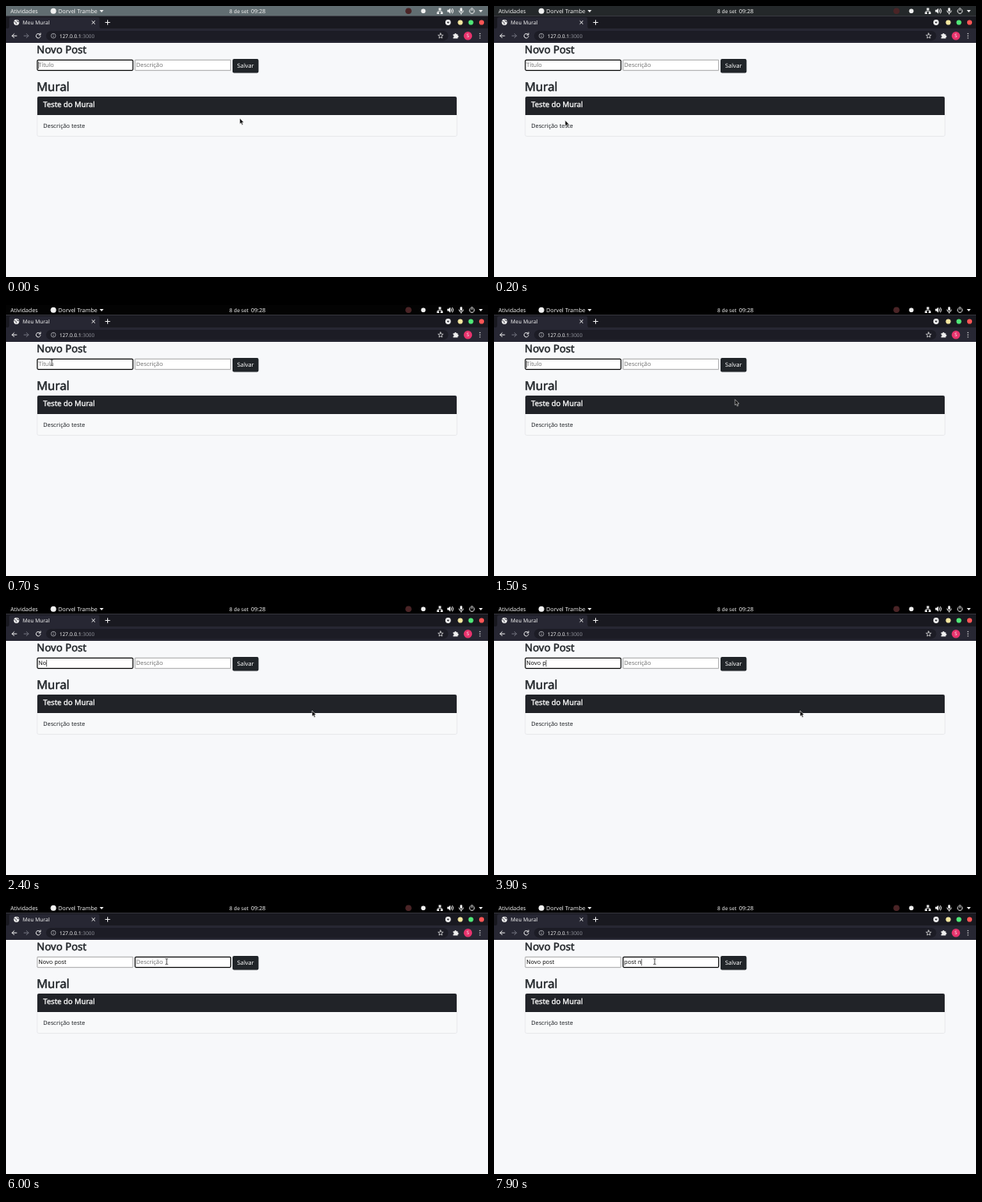
Animation, 600 px wide and 338 px high, one loop 8000 ms. Source, as an HTML page:

```html
<!DOCTYPE html>
<html lang="pt-BR">
<head>
<meta charset="utf-8">
<title>Meu Mural</title>
<style>
  html, body { margin: 0; width: 100%; height: 100%; overflow: hidden; background: #f7f8fa; }
  svg { display: block; width: 600px; height: 338px; }
  text { font-family: "Noto Sans", "Open Sans", sans-serif; font-size: 7.3px; fill: #212529; white-space: pre; text-rendering: geometricPrecision; }
  .bar text, .tabs text { fill: #f0f0f0; }
  .bar text { font-size: 7.05px; }
  .heading { stroke: #212529; stroke-width: .5; }
  .line { fill: none; stroke: #f0f0f0; stroke-width: 1; stroke-linecap: round; stroke-linejoin: round; }
  .lit { fill: #f0f0f0; }
</style>
</head>
<body>
<svg viewBox="0 0 600 338">
  <rect width="600" height="338" fill="#f7f8fa"/>

  <g class="bar">
    <rect id="panel" width="600" height="12.5"/>
    <text x="5.5" y="8.8">Atividades</text>
    <circle class="lit" cx="59" cy="6.2" r="3.5"/>
    <text x="65" y="8.8">Dorvel Trambe</text>
    <path class="lit" d="M116.5 5h5l-2.5 3z"/>
    <text x="278" y="8.8" style="font-size:6.5px">8 de set</text>
    <text x="305" y="8.8">09:28</text>
    <circle cx="501" cy="6.2" r="3.8" fill="#4a2426"/>
    <circle class="lit" cx="519.5" cy="6.2" r="2.8"/>
    <path class="lit" d="M538.6 2.6h3v2.6h-3zM536.4 7.4h2.8v2.6h-2.8zM541 7.4h2.8v2.6h-2.8z"/>
    <path class="line" style="stroke-width:.7" d="M540.1 5v1.4M537.8 7.6v-1.2h4.6v1.2"/>
    <path class="lit" d="M549.3 4.8h1.7l2.2-2.1v7l-2.2-2.1h-1.7z"/>
    <path class="line" d="M554.4 4.8q1 1.4 0 2.8M555.8 3.4q2.2 2.8 0 5.6"/>
    <rect class="lit" x="565.2" y="2.2" width="2.8" height="5" rx="1.4"/>
    <path class="line" d="M563.9 6q0 2.6 2.7 2.6t2.7-2.6M566.6 8.6v1.6"/>
    <path class="line" d="M578.4 3.8a3 3 0 1 0 3.2 0M580 2.4v3.2"/>
    <path class="lit" d="M588.5 5h5l-2.5 3z"/>
  </g>

  <g class="tabs">
    <rect y="12.5" width="600" height="33.5" fill="#272733"/>
    <path fill="#191920" d="M0 12.5H600V28H119q-2.6 0-2.6-2.6V16q0-2-2-2H6q-2 0-2 2v9.4q0 2.6-2.6 2.6H0z"/>
    <circle class="lit" cx="13" cy="20.5" r="3.4"/>
    <path d="M10.2 19.2l2.4 1.3 .4 2.4M13.6 17.6l.4 1.6 2 .5" fill="none" stroke="#272733" stroke-width=".8"/>
    <text x="20.8" y="23.1" style="font-size:6.6px">Meu Mural</text>
    <path class="line" d="M107 18.7l3.6 3.6m0-3.6l-3.6 3.6M123.8 20.5h5.4m-2.7-2.7v5.4"/>
    <circle class="lit" cx="550.3" cy="20.5" r="3.4"/>
    <path d="M548.6 19.7h3.4l-1.7 2.1z" fill="#191920"/>
    <circle cx="565.5" cy="20.5" r="3.1" fill="#f6e7a0"/>
    <circle cx="578.7" cy="20.5" r="3.1" fill="#50e878"/>
    <circle cx="592" cy="20.5" r="3.1" fill="#ff5555"/>

    <rect x="50" y="31" width="500.5" height="12.4" rx="6.2" fill="#1c1c25"/>
    <path class="line" d="M13.2 37.2H7.6m2.5-2.5l-2.5 2.5 2.5 2.5"/>
    <path class="line" style="stroke:#70727e" d="M22.4 37.2H28m-2.5-2.5l2.5 2.5-2.5 2.5"/>
    <path class="line" d="M42.5 35.6a2.8 2.8 0 1 0 .5 2.2M43 34v2h-2"/>
    <g stroke="#a6a7ae" fill="none" stroke-width=".8">
      <circle cx="59" cy="37.2" r="2.9"/><path d="M59 36.8v2M59 35.2v.8"/>
    </g>
    <text x="66.5" y="39.5" style="font-size:6.45px">127.0.0.1<tspan fill="#8e9098">:3000</tspan></text>
    <path id="star" class="line" style="stroke-width:.7"/>
    <path class="lit" d="M556.6 35.2h1.8a1.1 1.1 0 0 1 2.2 0h1.8v1.8a1.1 1.1 0 0 1 0 2.2v1.4h-5.8v-1.7a1 1 0 0 0 0-2z"/>
    <circle cx="575" cy="37.2" r="5.2" fill="#e8336d"/>
    <text x="575" y="39.4" text-anchor="middle" style="font-size:6px">S</text>
    <path class="line" style="stroke-width:1.4" d="M590 34.5v0M590 37.2v0M590 39.9v0"/>
  </g>

  <text class="heading" x="38.3" y="59.3" style="font-size:13px">Novo Post</text>
  <g id="title"><rect x="39" y="67.3" width="119" height="13" fill="#fff"/><text x="40.3" y="76.4"></text><path/></g>
  <g id="desc"><rect x="160.7" y="67.3" width="119" height="13" fill="#fff"/><text x="162" y="76.4"></text><path/></g>
  <rect x="282" y="66" width="32.4" height="17.5" rx="1.9" fill="#212529"/>
  <text x="287.8" y="77.4" style="fill:#fff">Salvar</text>

  <text class="heading" x="38.2" y="105.5" style="font-size:15px">Mural</text>
  <rect x="38.9" y="113" width="522.4" height="49.5" rx="1.8" fill="#f8f9fa" stroke="#dfe0e2" stroke-width=".6"/>
  <path d="M39 136V114.8q0-1.8 1.8-1.8H559.2q1.8 0 1.8 1.8V136z" fill="#212328"/>
  <text x="46.3" y="125.5" style="font-size:9.3px;fill:#fff;stroke:#fff;stroke-width:.3">Teste do Mural</text>
  <text x="46.2" y="152">Descrição teste</text>

  <path id="arrow" d="M0 0v7.2l1.6-1.4 1.2 2.6 1.3-.6-1.2-2.5h2.2z" fill="#111" stroke="#fff" stroke-width=".5"/>
  <g id="beam" fill="none">
    <path d="M-1.6-3.6Q0-3.6 0-2.8Q0-3.6 1.6-3.6M0-3V3M-1.6 3.6Q0 3.6 0 2.8Q0 3.6 1.6 3.6" stroke="#fff" stroke-width="1.4"/>
    <path d="M-1.6-3.6Q0-3.6 0-2.8Q0-3.6 1.6-3.6M0-3V3M-1.6 3.6Q0 3.6 0 2.8Q0 3.6 1.6 3.6" stroke="#222" stroke-width=".8"/>
  </g>
</svg>
<script>
const LOOP = 8000, STEP = 100, BLINK = 500, FOCUS_AT = 5500;
const PANEL = [97, 109, 113], PANEL_FADE = 200;
const $ = id => document.getElementById(id);

// time, x, y of the pointer
const track = [
  [0, 291, 140], [100, 188, 141], [200, 88.5, 142.5], [400, 66, 92], [600, 57, 72],
  [1200, 57, 72], [1600, 381, 133], [4600, 381, 133], [5000, 236, 84],
  [5200, 204, 66], [5400, 200, 73], [LOOP, 200, 73]
];

const field = (id, hint, text, keys, caretStart) => {
  const [box, label, caret] = $(id).children;
  return { box, label, caret, hint, text, keys, caretStart, x: +label.getAttribute("x") };
};
const title = field("title", "Título", "Novo post",
  [1900, 2300, 2900, 3100, 3400, 3800, 4100, 4300, 4500], 1100);
const desc = field("desc", "Descrição", "post n",
  [6600, 6800, 6900, 7100, 7300, 7900], FOCUS_AT);

function pointerAt(t) {
  const i = Math.max(1, track.findIndex(p => p[0] >= t));
  const [t0, x0, y0] = track[i - 1], [t1, x1, y1] = track[i];
  const k = (t - t0) / (t1 - t0);
  return [x0 + (x1 - x0) * k, y0 + (y1 - y0) * k];
}

function drawField(f, t, focused) {
  const typed = f.keys.filter(k => k <= t);
  const value = f.text.slice(0, typed.length);
  f.label.textContent = value || f.hint;
  f.label.style.fill = value ? "#111" : "#757575";
  f.box.setAttribute("stroke", focused ? "#101010" : "#858585");
  f.box.setAttribute("stroke-width", focused ? 1.25 : .7);
  f.box.setAttribute("rx", focused ? 1.2 : .4);

  const since = t - (typed.length ? typed[typed.length - 1] : f.caretStart);
  const lit = t < STEP || since >= 0 && since % (2 * BLINK) < BLINK;
  const x = f.x + (value ? f.label.getComputedTextLength() : 0) + .3;
  f.caret.setAttribute("d", `M${x} 69.4V78.2`);
  f.caret.setAttribute("stroke", "#111");
  f.caret.setAttribute("stroke-width", .6);
  f.caret.style.display = focused && lit ? "" : "none";
}

function drawPointer(t) {
  const [x, y] = pointerAt(t);
  const inField = y > 67 && y < 81 && (x > 39 && x < 158 || x > 160 && x < 280);
  $("arrow").style.display = inField ? "none" : "";
  $("beam").style.display = inField ? "" : "none";
  $(inField ? "beam" : "arrow").setAttribute("transform", `translate(${x} ${y})`);
}

function drawPanel(t) {
  const k = Math.exp(-t / PANEL_FADE);
  $("panel").setAttribute("fill", `rgb(${PANEL.map(c => Math.round(c * k))})`);
}

function draw(ms) {
  const t = Math.floor(ms % LOOP / STEP) * STEP;
  drawPanel(t);
  drawField(title, t, t < FOCUS_AT);
  drawField(desc, t, t >= FOCUS_AT);
  drawPointer(t);
}

$("star").setAttribute("d", "M" + Array.from({ length: 10 }, (_, i) => {
  const r = i % 2 ? 1.5 : 3.4, a = i * Math.PI / 5;
  return `${541 + r * Math.sin(a)} ${37.4 - r * Math.cos(a)}`;
}).join("L") + "Z");

const start = performance.now();
function tick() {
  draw(performance.now() - start);
  requestAnimationFrame(tick);
}
tick();
</script>
</body>
</html>
```
